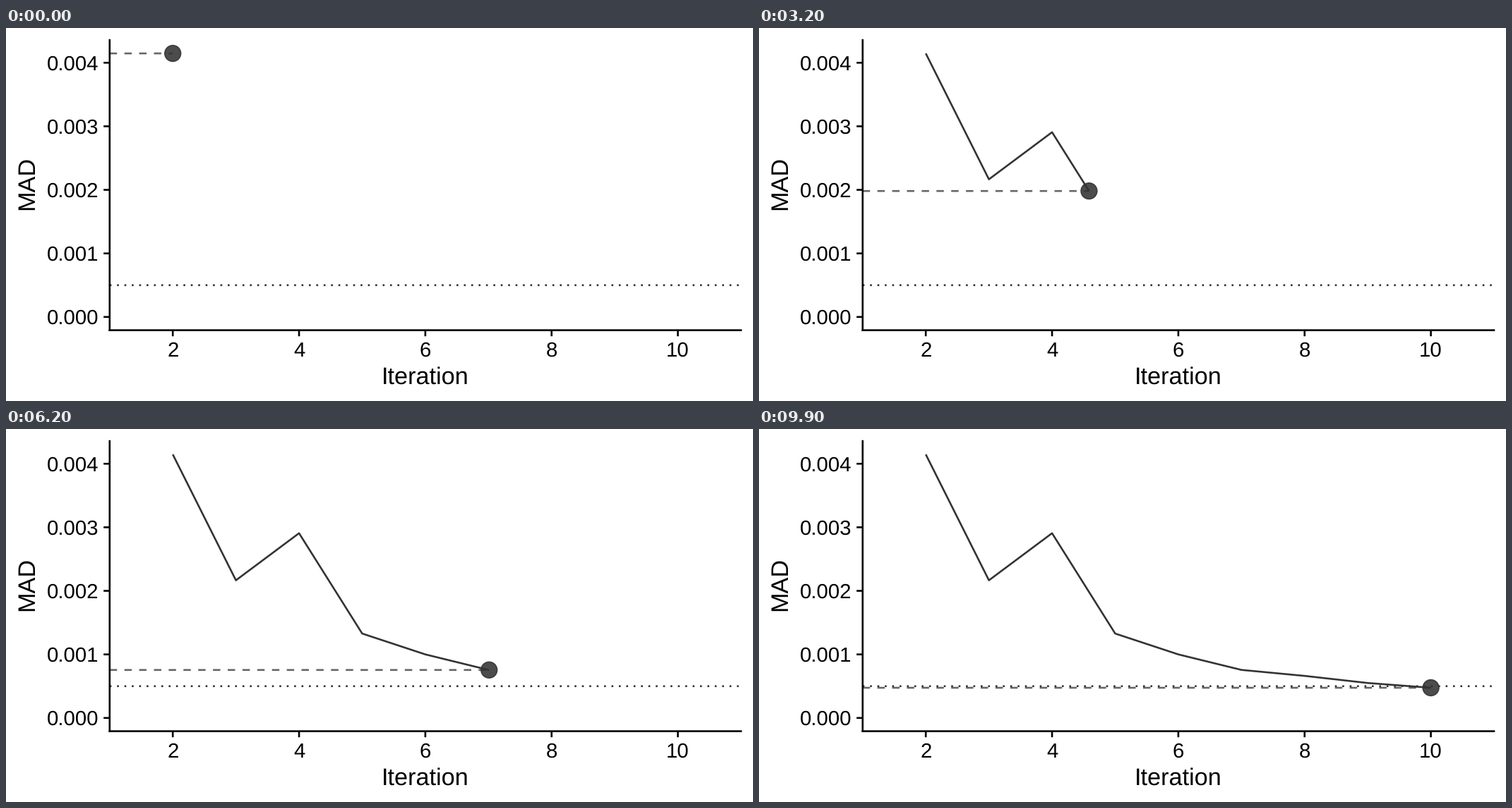
A matplotlib script for the animation above (10 s loop, 1058 px wide and 529 px high).

```python
import matplotlib.pyplot as plt
import numpy as np
from matplotlib.animation import FuncAnimation
from matplotlib.patches import Circle

W, H, DPI = 1058, 529, 64
FRAMES, INTERVAL = 100, 100
PT = 72 / DPI                       # points per pixel
LEFT, RIGHT, TOP, BOTTOM = 146.8, 1041, 17.1, 428.6
LINE = 2.613
DARK, GREY = "#333333", "#666666"

STEPS = np.arange(2, 11)
MAD = np.array([4.147, 2.166, 2.907, 1.328, 1.0, 0.756, 0.662, 0.55, 0.475]) / 1000

plt.rcParams["font.family"] = "Liberation Sans"
plt.rcParams["text.hinting"] = "none"
plt.rcParams["path.simplify"] = False


def px(x):
    return LEFT + (x - 1) * (RIGHT - LEFT) / 10


def py(y):
    return 409.8 - y * 90130


fig = plt.figure(figsize=(W / DPI, H / DPI), dpi=DPI, facecolor="white")
ax = fig.add_axes([0, 0, 1, 1])
ax.set_xlim(0, W)
ax.set_ylim(H, 0)
ax.axis("off")


def stroke(xs, ys, color="black", z=5, **kw):
    line, = ax.plot(xs, ys, color=color, lw=LINE * PT, zorder=z, snap=False,
                    solid_capstyle="butt", dash_capstyle="butt",
                    solid_joinstyle="round", **kw)
    return line


def label(x, y, text, size, **kw):
    ax.text(x, y, text, fontsize=size * PT, color="black",
            ha="center", va="baseline", **kw)


# Axes, ticks and labels
half = LINE / 2
stroke([LEFT, LEFT], [TOP - half, BOTTOM + half])
stroke([LEFT - half, RIGHT + half], [BOTTOM, BOTTOM])
for k in range(5):
    y = py(k / 1000)
    stroke([LEFT - 8.6, LEFT], [y, y])
    label(95, round(y + 10.4), f"{k / 1000:.3f}", 29.4)
for k in range(2, 11, 2):
    x = px(k)
    stroke([x, x], [BOTTOM, BOTTOM + 8.6])
    label(x, 466, str(k), 29.4)
label(593.5, 505, "Iteration", 34.3)
label(39, 220, "MAD", 34.3, rotation=90, rotation_mode="anchor")

# Threshold and moving parts
stroke([LEFT, RIGHT], [py(0.0005)] * 2, DARK, 2, linestyle=(0, (1, 3)))
guide = stroke([], [], GREY, 1, linestyle=(0, (4, 4)))
trace = stroke([], [], DARK, 3)
dot = Circle((0, 0), 11.32, facecolor=DARK, edgecolor=DARK, lw=1.736 * PT,
             alpha=0.88, zorder=4)
ax.add_patch(dot)


def update(i):
    now = 2 + 8 * i / (FRAMES - 1)
    level = np.interp(now, STEPS, MAD)
    past = STEPS < now
    x, y = px(now), py(level)
    trace.set_data(px(np.append(STEPS[past], now)),
                   py(np.append(MAD[past], level)))
    guide.set_data([LEFT, x], [y, y])
    dot.center = (x, y)
    return guide, trace, dot


anim = FuncAnimation(fig, update, frames=FRAMES, interval=INTERVAL,
                     init_func=lambda: update(0), repeat=True, repeat_delay=0)
plt.show()
```
